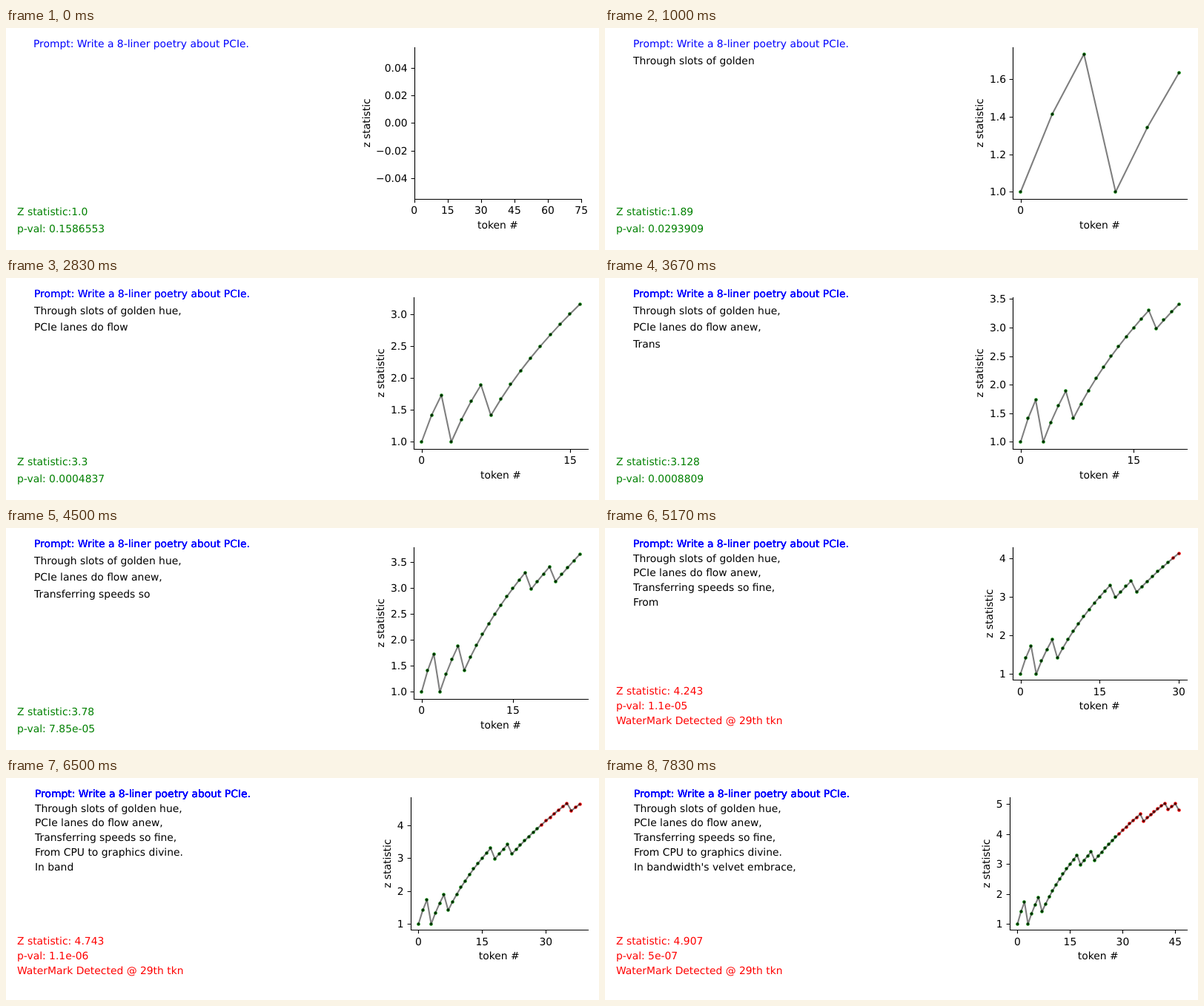
An HTML page that plays this animation: 800x300 px, repeating every 8 s.

```html
<!DOCTYPE html>
<html lang="en">
<head>
<meta charset="utf-8">
<title>Watermark detection, token by token</title>
<style>
  html, body { margin: 0; width: 100%; height: 100%; overflow: hidden; background: #fff; }
  svg { display: block; width: 800px; height: 300px; }
  text { font: 13.889px 'DejaVu Sans', sans-serif; text-rendering: geometricPrecision; }
  .axis { fill: none; stroke: #000; stroke-width: 1.11; }
  .line { fill: none; stroke: #000; stroke-width: 2.08; stroke-opacity: .5; stroke-linejoin: round; }
</style>
</head>
<body>
<svg id="stage" viewBox="0 0 800 300"></svg>
<script>
const stage = document.getElementById('stage');
const LOOP = 8000, TOP = 26, LIMIT = 4;
const PROMPT = 'Prompt: Write a 8-liner poetry about PCIe.';
const TOKENS = ('Th|rough| sl|ots| of| golden| h|ue|,|\n|P|CI|e| lan|es| do| flow| an|ew|,|\n|' +
  'Trans|fer|ring| spe|eds| so| fine|,|\n|From| CPU| to| graphics| divine|.|\n|' +
  "In| band|width|'|s| vel|vet| embra|ce|,").split('|');

// z = (hits - misses) / sqrt(tokens)
const MISSES = [3, 7, 18, 22, 36, 43, 46];
let score = 0;
const Z = Array.from({ length: 48 }, (_, i) =>
  (score += MISSES.includes(i) ? -1 : 1) / Math.sqrt(i + 1));
const DETECTED = Z.findIndex(z => z > LIMIT);

const snap = v => Math.floor(v + .5) + .5;

// Upper tail of the normal distribution, by Simpson's rule
function tail(z) {
  const n = 800, h = 8 / n;
  let sum = 0;
  for (let i = 0; i <= n; i++) {
    const weight = i === 0 || i === n ? 1 : i % 2 ? 4 : 2;
    sum += weight * Math.exp(-((z + i * h) ** 2) / 2);
  }
  return sum * h / 3 / Math.sqrt(2 * Math.PI);
}

function formatNumber(v, digits) {
  const r = Math.round(v * 10 ** digits) / 10 ** digits;
  if (Number.isInteger(r)) return r.toFixed(1);
  return r < 1e-4 ? r.toExponential().replace('e-', 'e-0') : String(r);
}

function tickStep(range, bins) {
  const raw = range / bins, scale = 10 ** Math.floor(Math.log10(raw));
  return [1, 2, 2.5, 5, 10].find(s => s * scale >= raw) * scale;
}

function decimals(step) {
  let d = 0;
  while (Math.abs(step * 10 ** d - Math.round(step * 10 ** d)) > 1e-6) d++;
  return d;
}

const labelWidth = (d, negative) => 8.84 + (d ? 4.41 + 8.84 * d : 0) + (negative ? 10.5 : 0);

function limits(count) {
  if (count === 0) return { x0: 0, x1: 75, y0: -.055, y1: .055 };
  if (count === 1) return { x0: -.055, x1: .055, y0: .945, y1: 1.055 };
  const last = count - 1, max = Math.max(...Z.slice(0, count)), pad = (max - 1) * .05;
  return { x0: -.05 * last, x1: 1.05 * last, y0: 1 - pad, y1: max + pad };
}

// Margins are measured on the default axes, then the axes are fitted to them
function layout(k) {
  const lim = limits(k), { x0, x1, y0, y1 } = lim;
  const xTicks = [0, 15, 30, 45, 60, 75].filter(t => t <= x1);
  const lastTick = xTicks[xTicks.length - 1];
  const overhang = lastTick ? Math.max(0, 8.8 - (x1 - lastTick) / (x1 - x0) * 188) : 0;
  const extra = labelWidth(decimals(tickStep(y1 - y0, 8)), y0 < 0) - labelWidth(1);
  const width = 235 - (extra + overhang) / 3;
  const right = 785 - overhang;
  const bottom = k < DETECTED ? 230.8 : 205.4;
  return { ...lim, xTicks, right, bottom, left: right - width,
    textX: Math.floor(15.4 + width / 10), height: bottom - TOP };
}

function text(x, y, str, fill = '#000', anchor = 'start', more = '') {
  return `<text x="${x}" y="${y}" fill="${fill}" text-anchor="${anchor}"${more}>${str}</text>`;
}

function drawText(k, box) {
  const rowY = row => Math.round(TOP + .11 * row * box.height);
  const lines = TOKENS.slice(0, k).join('').split('\n');
  const found = k >= DETECTED;
  const stats = [
    'Z statistic:' + (found ? ' ' : '') + formatNumber(Z[k], 3),
    'p-val: ' + formatNumber(tail(Z[k]), 7)
  ];
  if (found) stats.push(`WaterMark Detected @ ${DETECTED}th tkn`);
  // the prompt is painted once more for every line
  return lines.map((line, i) =>
    text(box.textX, rowY(0), PROMPT, '#00f') + text(box.textX, rowY(i + 1), line)).join('') +
    stats.map((s, i) => text(15, rowY(10.09 + i), s, found ? '#f00' : '#008000')).join('');
}

function drawChart(k, box) {
  const { left, right, bottom, height, x0, x1, y0, y1 } = box;
  const px = x => left + (x - x0) / (x1 - x0) * (right - left);
  const py = y => bottom - (y - y0) / (y1 - y0) * height;
  const ax = snap(left), ay = snap(bottom);
  let out = '', path = '', dots = '', cores = '';

  for (let i = 0; i < k; i++) {
    const x = px(i), y = py(Z[i]);
    const at = `cx="${Math.floor(x) + .5}" cy="${Math.floor(y) + .5}"`;
    path += `${i ? 'L' : 'M'}${x.toFixed(2)} ${y.toFixed(2)}`;
    dots += `<circle ${at} r="2.3" fill="${i < DETECTED ? '#008000' : '#f00'}"/>`;
    cores += `<circle ${at} r="1.45" fill-opacity=".5"/>`;
  }
  out += dots + (k ? `<path class="line" d="${path}"/>` : '') + cores;

  let axis = `M${ax} ${TOP}V${ay + .5}M${ax - .5} ${ay}H${snap(right) + .5}`;
  for (const t of box.xTicks) {
    axis += `M${snap(px(t))} ${ay}v4.86`;
    out += text(px(t), Math.round(bottom + 20.5), t, '#000', 'middle');
  }
  const step = tickStep(y1 - y0, Math.floor(height * .72 / 20)), d = decimals(step);
  for (let n = Math.ceil(y0 / step); n * step <= y1; n++) {
    const y = py(n * step), sign = n < 0 ? '\u2212' : '';
    axis += `M${ax} ${snap(y)}h-4.86`;
    out += text(left - 9, Math.round(y + 5), sign + Math.abs(n * step).toFixed(d), '#000', 'end');
  }
  out += `<path class="axis" d="${axis}"/>`;

  out += text((left + right) / 2, Math.round(bottom + 39.8), 'token #', '#000', 'middle');
  const lx = Math.round(left - 18.2 - labelWidth(d, y0 < 0)), ly = (TOP + bottom) / 2;
  return out + text(lx, ly, 'z statistic', '#000', 'middle', ` transform="rotate(-90 ${lx} ${ly})"`);
}

let shown = -1;
function render(ms) {
  // six tokens a second, on a 10 ms grid
  const k = Math.min(47, Math.floor((Math.floor(ms % LOOP / 10) + .4) * .06));
  if (k === shown) return;
  shown = k;
  const box = layout(k);
  stage.innerHTML = drawText(k, box) + drawChart(k, box);
}

const start = performance.now();
function tick() {
  render(performance.now() - start);
  requestAnimationFrame(tick);
}
tick();
</script>
</body>
</html>
```
